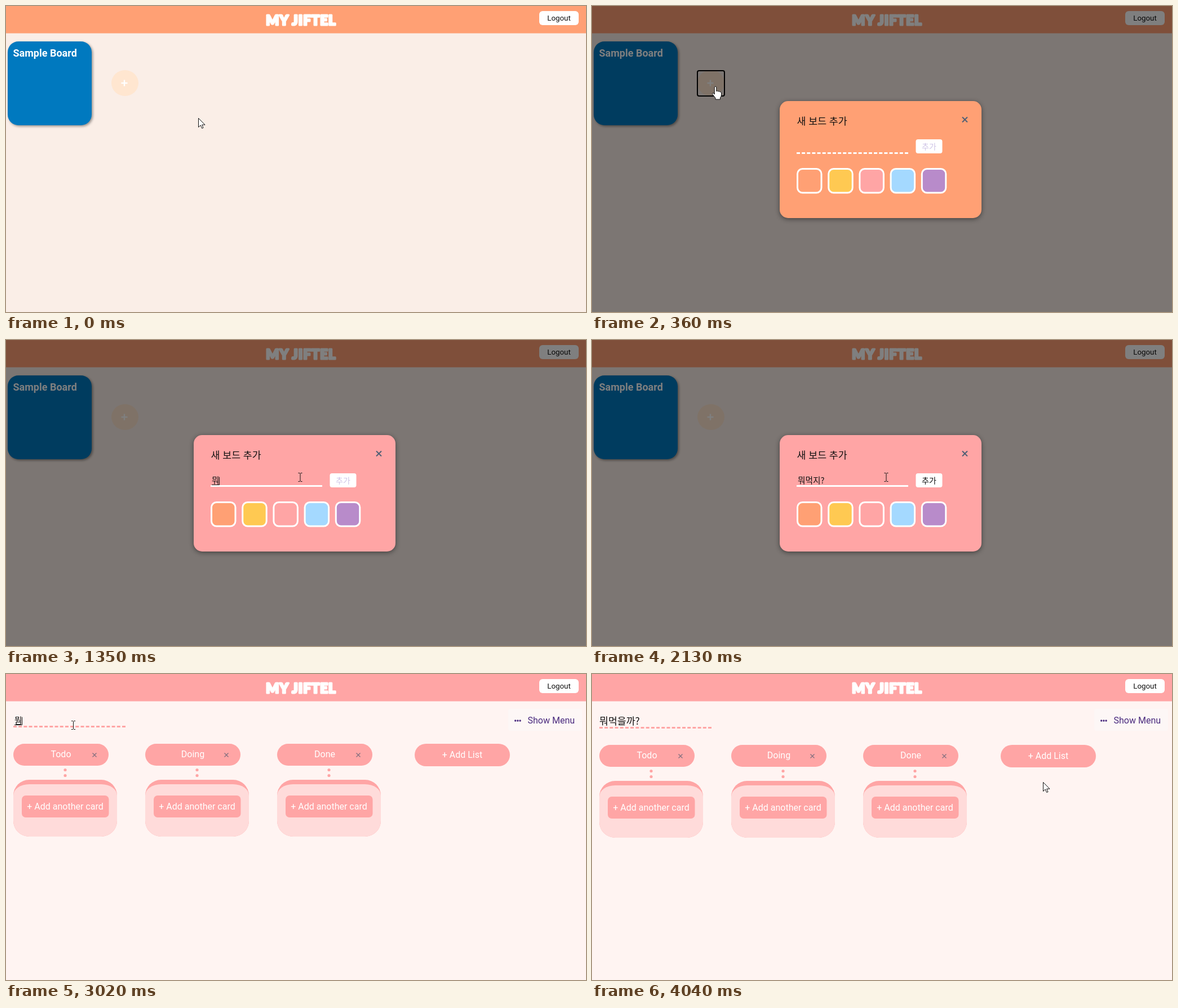
Write an HTML page that moves like this. It is 1029 px wide and 544 px high and loops after 4.12 s.

```html
<!DOCTYPE html>
<html lang="ko">
<head>
<meta charset="utf-8">
<title>Board</title>
<style>
  html, body { margin: 0; width: 100%; height: 100%; overflow: hidden; background: #faeee7; }
  svg { display: block; width: 100%; height: 100%; }
  text { font: 16px Roboto, sans-serif; white-space: pre; }
  .mid { text-anchor: middle; }
  .white { fill: #fff; }
  .ko { font: 17.3px "Noto Sans CJK KR", "Noto Sans CJK", sans-serif; fill: #111; }
  .typed { font-size: 14.7px; }
  .logo { font: 900 24px Lato, sans-serif; letter-spacing: 1px; fill: #fff; stroke: #fff; stroke-width: 3px; stroke-linejoin: round; }
  .logout { font-size: 13.33px; fill: #111; }
  .tile { filter: drop-shadow(2px 2px 2px rgba(0, 0, 0, .4)); }
  .dialog { filter: drop-shadow(0 2px 4px rgba(0, 0, 0, .45)); }
  .cross { fill: none; stroke: #85707f; stroke-width: 1.4px; }
  .cursor { fill: #fff; stroke: #111; stroke-width: 1px; stroke-linejoin: round; }
</style>
</head>
<body>
<svg viewBox="0 0 1029 544">
  <rect id="page" width="1029" height="544"/>
  <rect id="header" width="1029" height="48.5"/>
  <text class="logo mid" x="523.5" y="34">MY JIFTEL</text>
  <rect x="946" y="9" width="70" height="25" rx="6" fill="#fff"/>
  <text class="logout mid" x="981" y="26">Logout</text>

  <g id="home">
    <rect class="tile" x="3" y="63" width="149" height="149" rx="19" fill="#0079bf"/>
    <text class="white" x="12.5" y="90" style="font-size:18px;font-weight:700">Sample Board</text>
    <ellipse cx="211" cy="137" rx="24" ry="23" fill="#ffe6d0"/>
    <path d="M204.500 137h11M210 131.500v11" stroke="#fff" stroke-width="2.400"/>
    <rect id="shade" width="1029" height="544" opacity=".5"/>
    <rect id="ring" x="187" y="115" width="48" height="45" rx="3" fill="none" stroke="#000" stroke-width="2"/>
  </g>

  <g id="modal">
    <rect id="dialog" class="dialog" x="333" y="169" width="358" height="208" rx="15"/>
    <text class="ko" x="363.500" y="211">새 보드 추가</text>
    <path d="M657 197.500l9 9m0-9l-9 9" stroke="#4f5f75" stroke-width="2"/>
    <path id="modalLine" stroke="#fff" stroke-width="3"/>
    <rect x="574.500" y="237" width="47" height="25" rx="4" fill="#fff"/>
    <text id="add" class="ko mid" x="598" y="255" style="font-size:14px">추가</text>
    <g id="swatches"></g>
  </g>

  <g id="board">
    <rect x="891" y="62" width="131" height="39" rx="4" fill="#fdf7f6"/>
    <g fill="#4b2c7f">
      <circle cx="903.700" cy="83" r="1.700"/><circle cx="907.900" cy="83" r="1.700"/><circle cx="912.100" cy="83" r="1.700"/>
      <text x="925.500" y="88">Show Menu</text>
    </g>
    <text id="boardName" class="ko" x="13" y="90"></text>
    <g id="lists">
      <path d="M13 95.500h199" stroke="#ffa5a5" stroke-width="3" stroke-dasharray="6 3.190"/>
      <rect x="725" y="126" width="169" height="40" rx="20" fill="#ffa5a5"/>
      <text class="mid white" x="809.500" y="151">+ Add List</text>
    </g>
  </g>

  <g id="field">
    <text id="typed" class="ko typed"></text>
    <path id="compose" stroke="#111"/>
    <path id="caret" stroke="#111"/>
  </g>

  <g id="pointer" class="cursor">
    <path id="arrow" d="M.5 .5V16.500L4.200 13L6.700 18.500L9 17.500L6.700 12.200H12Z"/>
    <path id="hand" d="M-1.700 1Q0-1 1.700 1V8.500Q3.500 7 5 9Q6.800 7.600 8 9.800Q9.800 9 10.500 11V15Q10.500 18 8.500 20V23H0V20.500L-5.500 13.500Q-5.500 11-3 12L-1.700 14Z"/>
    <path id="beam" d="M-3.500-7.500H-1L0-6.500L1-7.500H3.500M0-6.500V6.500M-3.500 7.500H-1L0 6.500L1 7.500H3.500" fill="none"/>
  </g>
</svg>
<script>
const LOOP = 4120;
const $ = id => document.getElementById(id);
const show = (id, on) => { $(id).style.display = on ? '' : 'none'; };
const set = (id, attrs) => Object.entries(attrs).forEach(([k, v]) => $(id).setAttribute(k, v));

const ORANGE = '#ffa074', PINK = '#ffa5a5';

$('swatches').innerHTML = [ORANGE, '#ffc952', PINK, '#a4d9ff', '#b88bca'].map((color, i) =>
  `<rect x="${364.5 + i * 55.2}" y="289.5" width="42.500" height="42.500" rx="9" fill="${color}" stroke="#fff" stroke-width="3"/>`).join('');

$('lists').innerHTML += ['Todo', 'Doing', 'Done'].map((name, i) => `
  <g transform="translate(${13 + i * 234} 126)">
    <rect width="169" height="39" rx="19.500" fill="${PINK}"/>
    <text class="mid white" x="84.500" y="24">${name}</text>
    <path class="cross" d="M140.500 16.500l7 7m0-7l-7 7"/>
    <circle cx="92" cy="46.500" r="2.600" fill="${PINK}"/>
    <circle cx="92" cy="56.500" r="2.600" fill="${PINK}"/>
    <rect y="64" width="184" height="101" rx="28" fill="${PINK}"/>
    <path d="M0 92A28 20 0 0 1 28 72H156A28 20 0 0 1 184 92V137A28 28 0 0 1 156 165H28A28 28 0 0 1 0 137Z" fill="#ffdbda"/>
    <rect x="15" y="92" width="154.500" height="39" rx="7" fill="${PINK}"/>
    <text class="mid white" x="92" y="117">+ Add another card</text>
  </g>`).join('');

// Each track holds its last value until the next time.
const pointerTrack = [
  [0, 'arrow', 341, 199], [80, 'arrow', 300, 182], [170, 'hand', 222, 146], [270, 'hand', 219, 143],
  [490, 'arrow', 246, 160], [580, 'arrow', 318, 204], [650, 'arrow', 396, 252], [730, 'hand', 478, 302],
  [810, 'hand', 495, 310], [1200, 'beam', 522, 244], [2270, 'hand', 521, 243], [2330, 'hand', 521, 243],
  [2410, 'arrow', 380, 190], [2490, 'arrow', 200, 120], [2570, 'beam', 119.5, 91], [3950, 'arrow', 800, 192]
];
const typingTrack = [
  [0, ''], [1350, '뭐'], [1430, '뭐머'], [1510, '뭐먹'], [1660, '뭐먹'], [1740, '뭐먹ㅈ'], [1820, '뭐먹지'],
  [1980, '뭐먹지?'], [2650, '뭐먹'], [2730, ''], [2880, '무'], [2950, '뭐'], [3020, '뭠'], [3100, '뭐머'],
  [3250, '뭐먹'], [3330, '뭐먹ㅇ'], [3410, '뭐먹으'], [3490, '뭐먹을'], [3570, '뭐먹을ㄲ'],
  [3640, '뭐먹을까'], [3720, '뭐먹을까?']
];
const at = (track, t) => track.findLast(step => step[0] <= t);

function drawField(t, x, baseline, lineY) {
  const [, value] = at(typingTrack, t);
  const typed = $('typed');
  typed.textContent = value;
  set('typed', { x, y: baseline });
  const end = x + (value ? typed.getComputedTextLength() : 0);
  const composing = value && !value.endsWith('?') && !(t >= 2570 && t < 2880);
  const start = value.length > 1 ? x + typed.getSubStringLength(0, value.length - 1) : x;
  set('compose', { d: composing ? `M${start} ${lineY}H${end}` : '' });
  const caretX = Math.floor(end) + .5;
  set('caret', { d: t >= 2130 && t < 2270 ? '' : `M${caretX} ${lineY - 14}V${lineY}` });
}

function render(t) {
  const onBoard = t >= 2270;
  const modalOpen = t >= 270 && !onBoard;
  const naming = t >= 1270 && !onBoard;
  const renaming = t >= 2570 && t < 4040;
  const picked = t >= 970;

  set('page', { fill: onBoard ? '#fff4f2' : '#faeee7' });
  set('header', { fill: onBoard ? PINK : ORANGE });
  show('home', !onBoard);
  show('shade', modalOpen);
  show('ring', modalOpen && !picked);
  show('modal', modalOpen);
  show('board', onBoard);
  show('field', naming || renaming);

  set('dialog', { fill: picked ? PINK : ORANGE, height: naming ? 207 : 208 });
  set('swatches', { transform: `translate(0 ${naming ? -1 : 0})` });
  set('modalLine', {
    d: `M363 ${naming ? 259.5 : 261.5}h198`,
    'stroke-dasharray': naming ? 'none' : '6 3.14'
  });
  $('add').style.fill = t >= 1510 ? '#111' : '#cfc4e6';

  show('boardName', !renaming);
  $('boardName').textContent = t >= 4040 ? '뭐먹을까?' : '뭐먹지?';
  set('lists', { transform: `translate(0 ${renaming ? -2 : 0})` });

  if (naming) drawField(t, 365, 255, 257.5);
  if (renaming) drawField(t, 15, 88, 90.5);

  const [, kind, x, y] = at(pointerTrack, t);
  for (const id of ['arrow', 'hand', 'beam']) show(id, id === kind);
  set('pointer', { transform: `translate(${x} ${y})` });
}

function frame() {
  render(performance.now() % LOOP);
  requestAnimationFrame(frame);
}
frame();
</script>
</body>
</html>
```
